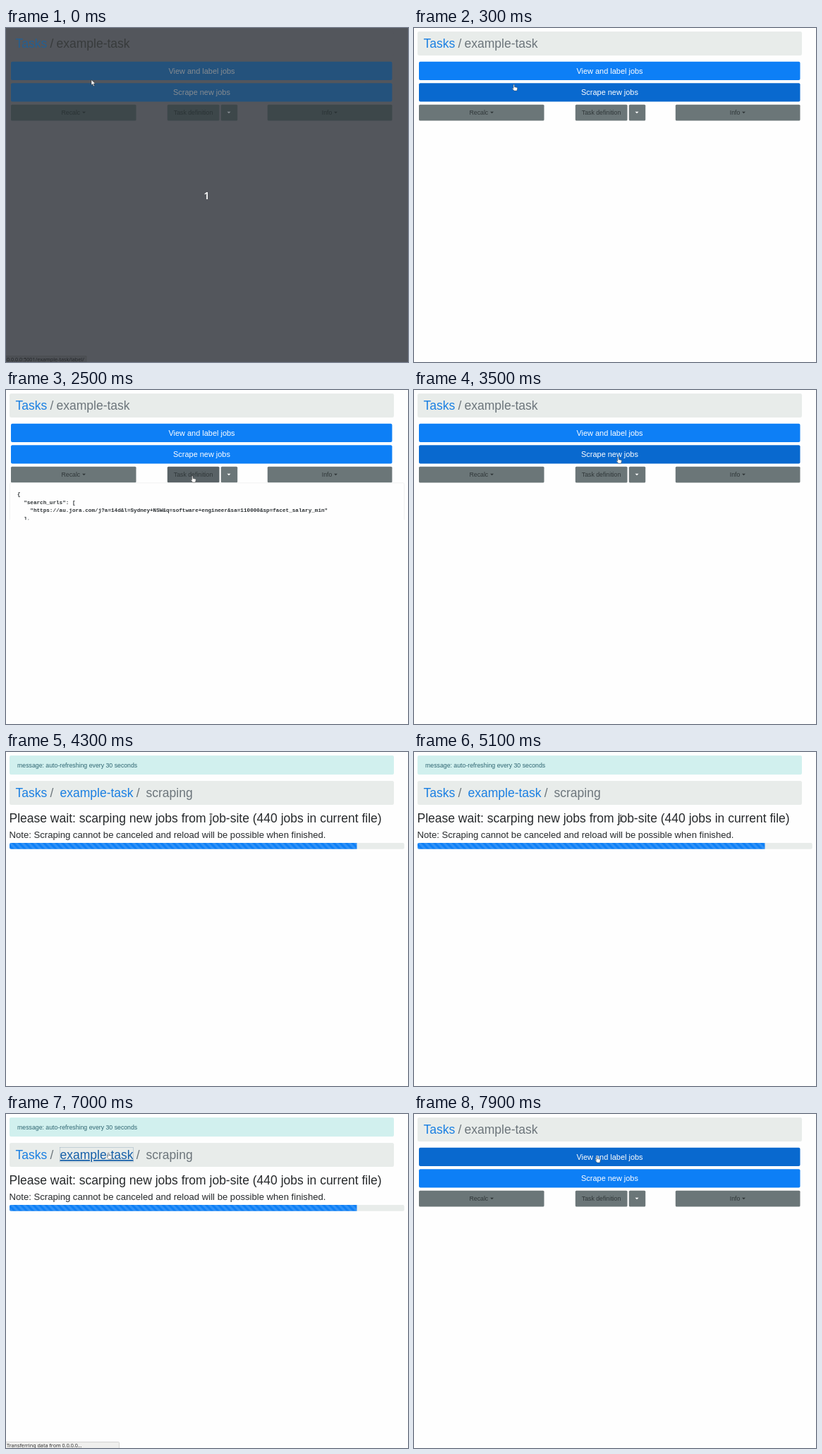
Recreate the animation shown at these times as an HTML page. Size 570 by 474 pixels, loop 8000 ms.

```html
<!DOCTYPE html>
<html lang="en">
<head>
<meta charset="utf-8">
<title>Task scraping</title>
<style>
  html, body { margin: 0; height: 100%; overflow: hidden; background: #fefefe; }
  svg {
    display: block; width: 570px; height: 474px;
    font: 8.75px "Liberation Sans", Arial, sans-serif;
    --page: #fefefe; --bar: #e8ecea; --blue: #0d7ff6; --deep: #0969cf; --link: #1a7fe2;
    --grey: #6b7678; --dark: #596266; --muted: #6c757b; --label: #303739; --light: #fff;
  }
  svg.dim {
    --page: #53565c; --bar: #53565c; --blue: #24527c; --deep: #24527c; --link: #255f91;
    --grey: #3d474a; --dark: #3d474a; --muted: #383b3c; --label: #2a3335; --light: #858b91;
  }
  text { white-space: pre; }
  .page { fill: var(--page); }
  .bar { fill: var(--bar); }
  .blue { fill: var(--blue); }
  .blue.hover { fill: var(--deep); }
  .grey { fill: var(--grey); }
  .grey.hover { fill: var(--dark); }
  .title { font-size: 17.5px; fill: var(--muted); }
  .link { fill: var(--link); }
  .link.hover { fill: #155fa8; text-decoration: underline; }
  .big { font-size: 10.94px; text-anchor: middle; fill: var(--light); }
  .label { fill: var(--label); }
  .light { fill: var(--light); }
  #json { font: bold 7.656px "Liberation Mono", "Courier New", monospace; fill: #2b3033; }
  #status text { font: 7.2px "Noto Sans", "Open Sans", sans-serif; }
</style>
</head>
<body>
<svg id="stage" viewBox="0 0 570 474">
  <defs>
    <clipPath id="fold"><rect id="foldBox" x="4" y="131" width="562" height="0"/></clipPath>
    <pattern id="stripes" width="8.75" height="8.75" patternUnits="userSpaceOnUse">
      <path fill="#fff" fill-opacity=".15" d="M0 8.75V4.375L4.375 8.75zM0 0H4.375L8.75 4.375V8.75z"/>
    </pattern>
  </defs>
  <rect class="page" width="570" height="474"/>

  <g id="task">
    <rect class="bar" x="5" y="5" width="545" height="34" rx="2.2"/>
    <g class="title">
      <text class="link" x="13.5" y="28">Tasks</text>
      <text x="62.5" y="28">/</text>
      <text x="71.5" y="28">example-task</text>
    </g>
    <rect class="button blue" x="7" y="47.7" width="540.5" height="26.3" rx="2"/>
    <rect class="button blue" x="7" y="78.2" width="540.5" height="26.3" rx="2"/>
    <rect class="button grey" x="7" y="108.7" width="177.5" height="22.8" rx="1.5"/>
    <rect class="button grey" x="228.8" y="108.7" width="73.7" height="22.8" rx="1.5"/>
    <rect class="button grey" x="304.8" y="108.7" width="23.4" height="22.8" rx="1.5"/>
    <rect class="button grey" x="370.8" y="108.7" width="176.7" height="22.8" rx="1.5"/>
    <g class="big">
      <text x="277.5" y="64.7">View and label jobs</text>
      <text x="277.5" y="95.2">Scrape new jobs</text>
    </g>
    <g class="label">
      <text x="78.5" y="123">Recalc</text>
      <text x="237.8" y="123">Task definition</text>
      <text x="447.8" y="123">Info</text>
      <path d="M108 118.7h5l-2.5 2.6zM465 118.7h5l-2.5 2.6z"/>
      <path class="light" d="M313.5 118.7h5l-2.5 2.6z"/>
    </g>
    <g clip-path="url(#fold)">
      <rect x="5.3" y="131.8" width="559.4" height="438" rx="2" fill="#fefefe" stroke="#e6e8e8" stroke-width=".6"/>
      <g id="json"></g>
    </g>
    <rect id="thumb" x="565" y="1" width="4" height="386" rx="2" fill="#777" opacity="0"/>
  </g>

  <g id="scraping">
    <rect x="5" y="5" width="545" height="27" rx="2" fill="#d1f0ee"/>
    <text x="16" y="21.5" fill="#2f6672">message: auto-refreshing every 30 seconds</text>
    <rect class="bar" x="5" y="41" width="545" height="34" rx="2.2"/>
    <g class="title">
      <text class="link" x="13.5" y="64">Tasks</text>
      <text x="62.5" y="64">/</text>
      <text class="link" id="back" x="76.5" y="64">example-task</text>
      <text x="184.7" y="64">/</text>
      <text x="198.5" y="64">scraping</text>
    </g>
    <rect id="focus" x="76.5" y="47.5" width="104" height="20.5" fill="none" stroke="#7d98b0" stroke-width=".7" stroke-dasharray="1 1"/>
    <g fill="#26292b">
      <text x="4.5" y="100" font-size="17.5">Please wait: scarping new jobs from job-site (440 jobs in current file)</text>
      <text x="4.5" y="121.7" font-size="13.12">Note: Scraping cannot be canceled and reload will be possible when finished.</text>
    </g>
    <rect class="bar" x="5" y="129" width="559.7" height="8.75" rx="2"/>
    <path class="blue" d="M497.5 129V137.75H7a2 2 0 0 1-2-2V131a2 2 0 0 1 2-2z"/>
    <rect x="5" y="129" width="492.5" height="8.75" fill="url(#stripes)"/>
  </g>

  <g id="status">
    <rect x="-1" y="465.5" height="10" rx="1" fill="#efefed" stroke="#c4c4c2" stroke-width=".7"/>
    <text x="1" y="473.3" fill="#333"></text>
  </g>
  <text id="count" x="284.6" y="243" text-anchor="middle" fill="#fff" style="font:600 15px 'Open Sans','Noto Sans',sans-serif">1</text>

  <g id="cursor">
    <path id="arrow" d="M0 0V7.6L1.8 6 3.1 9 4.4 8.4 3.1 5.5H5.6z" fill="#fff" stroke="#222" stroke-width=".5"/>
    <path id="hand" d="M1.6.4Q2.3-.3 3 .4V3.6L6.6 4.3Q7.4 4.6 7.3 5.6L6.5 9H2.6L0 5.8Q.2 4.7 1.6 5.8z" fill="#fff" stroke="#444" stroke-width=".5"/>
    <path id="beam" d="M-2.2-4.5H2.2M0-4.5V4.5M-1.6 4.5H1.6" fill="none" stroke="#777" stroke-width="1.2"/>
  </g>
</svg>

<script>
const $ = id => document.getElementById(id);
const LOOP = 8000, PANEL = 440;
const stage = $('stage'), buttons = [...document.querySelectorAll('.button')];

// [time, x, y] of the pointer tip
const path = [
  [0, 121, 73.5], [100, 121, 74], [950, 251, 117], [1100, 251, 117], [1600, 256, 120],
  [1800, 257, 121], [1900, 262, 122], [2900, 262, 122], [3650, 290, 92], [4900, 291, 93],
  [5000, 291, 93], [5750, 324, 113], [6050, 324, 113], [6700, 188, 56], [6850, 143, 55],
  [7200, 143, 55], [7450, 170, 58], [7550, 170, 58], [7900, 257, 60], [8000, 257, 60]
];

const definition = {
  search_urls: ['https://au.jora.com/j?a=14d&l=Sydney+NSW&q=software+engineer&sa=110000&sp=facet_salary_min'],
  title_include: ['software', 'engineer', 'developer', 'backend'],
  title_exclude: ['manager', 'graduate', 'intern'],
  description_include: ['python', 'linux', 'remote', 'testing', 'database'],
  description_exclude: ['clearance', 'on-call'],
  labels: ['yes', 'maybe', 'no']
};
$('json').innerHTML = JSON.stringify(definition, null, 2).split('\n')
  .map((line, i) => `<text x="16" y="${150.4 + i * 11.48}">${line.replace(/&/g, '&amp;')}</text>`).join('');

const ramp = (t, from, to) => Math.min(1, Math.max(0, (t - from) / (to - from)));
const smooth = u => u * u * (3 - 2 * u);
const show = (id, on) => { $(id).style.display = on ? '' : 'none'; };
const inside = (x, y, l, t, r, b) => x >= l && x <= r && y >= t && y <= b;

function pointer(t) {
  const i = path.findIndex(p => p[0] > t), [t0, x0, y0] = path[i - 1], [t1, x1, y1] = path[i];
  const u = smooth(ramp(t, t0, t1));
  return [x0 + (x1 - x0) * u, y0 + (y1 - y0) * u];
}

function draw(t) {
  const dim = t < 100, scraping = t >= 4100 && t < 7200;
  const [x, y] = pointer(t);
  stage.classList.toggle('dim', dim);
  show('count', dim);
  show('task', !scraping);
  show('scraping', scraping);

  let over = false;
  for (const b of buttons) {
    const { x: l, y: top, width, height } = b.getAttributeNames().reduce((o, n) => ({ ...o, [n]: +b.getAttribute(n) }), {});
    const hit = !scraping && inside(x, y, l, top, l + width, top + height - .6);
    b.classList.toggle('hover', hit);
    over ||= hit;
  }
  const onLink = scraping && inside(x, y, 77, 47, 180, 68);
  $('back').classList.toggle('hover', onLink);
  show('focus', onLink && t >= 6900);

  const open = smooth(ramp(t, 1050, 1400)) - smooth(ramp(t, 2227, 2577));
  $('foldBox').setAttribute('height', open * PANEL);
  const fade = t < 2200 ? 1 - ramp(t, 1750, 1900) : 1;
  $('thumb').setAttribute('opacity', open * PANEL > 342 ? .5 * fade : 0);
  const shift = 8.75 * (1 - ramp((t + 900) % 1000, 0, 1000));
  $('stripes').setAttribute('patternTransform', `translate(${5 + shift} 129)`);

  const loading = (t >= 3800 && t < 4100) || (t >= 6900 && t < 7350);
  const [box, label] = $('status').children;
  show('status', dim || loading);
  box.setAttribute('width', dim ? 115 : 161.5);
  box.style.fill = dim ? '#4d5055' : '';
  box.style.stroke = dim ? '#484b50' : '';
  label.style.fill = dim ? '#25282b' : '';
  label.textContent = dim ? '0.0.0.0:5001/example-task/label/' : 'Transferring data from 0.0.0.0…';

  const kind = over || onLink ? 'hand' : scraping ? 'beam' : 'arrow';
  for (const k of ['arrow', 'hand', 'beam']) show(k, k === kind);
  $('cursor').setAttribute('transform', `translate(${x} ${y})`);
}

function tick() {
  draw(performance.now() % LOOP);
  requestAnimationFrame(tick);
}
tick();
</script>
</body>
</html>
```
